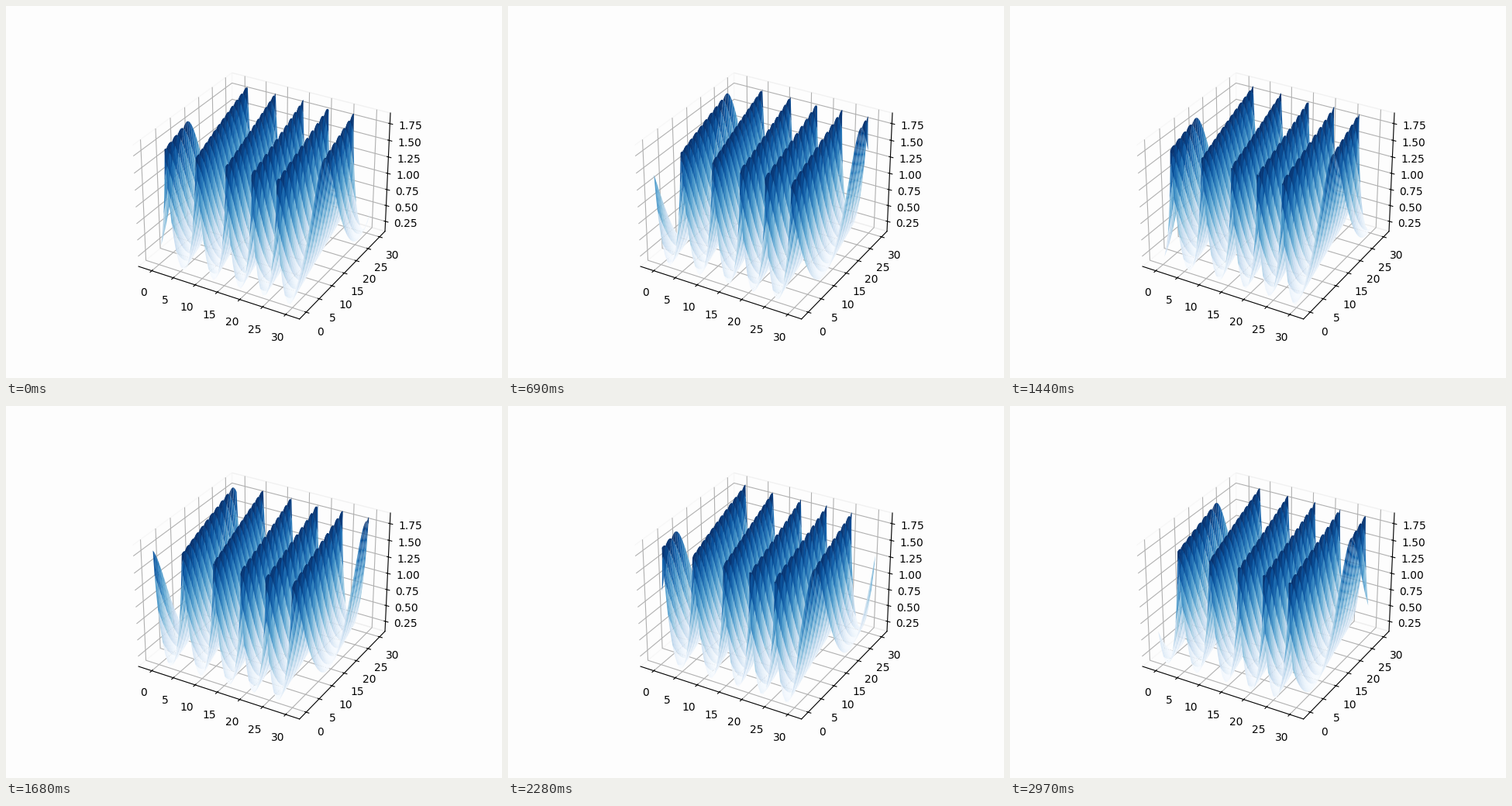
These frames come from a looping animation (640x480 px, 3000 ms). A matplotlib script:

```python
import numpy as np
import matplotlib.pyplot as plt
from matplotlib.animation import FuncAnimation
from mpl_toolkits.mplot3d.art3d import Poly3DCollection

FRAMES, INTERVAL = 100, 30
SIZE, CELLS = 30, 50
HEIGHT, PUSH_X, PUSH_Y = 0.87, 0.80, 0.19
KX, KY, OMEGA, OFFSET = 1.045, 0.215, 0.4, 2.33
PAPER = "#fdfdfd"

# two steps per cell, so that cell edges follow the curve
grid = np.linspace(0, SIZE, 2 * CELLS + 1)
X0, Y0 = np.meshgrid(grid, grid)
# crests bow to the right in the middle, most of all near the front
BOW = (1.45 - 0.02 * Y0) * np.sin(np.pi * X0 / SIZE) ** 2
PHASE = KX * (X0 - BOW) + KY * Y0 - OFFSET


def wave(frame):
    """Trochoidal wave: points circle around their rest position."""
    theta = PHASE - OMEGA * frame
    return np.stack([X0 - PUSH_X * np.sin(theta),
                     Y0 - PUSH_Y * np.sin(theta),
                     1 + HEIGHT * np.cos(theta)], axis=-1)


def cells(p):
    """Outline of every cell: its corners and edge midpoints."""
    low, mid, high = slice(0, -1, 2), slice(1, None, 2), slice(2, None, 2)
    ring = [(low, low), (low, mid), (low, high), (mid, high),
            (high, high), (high, mid), (high, low), (mid, low)]
    return np.stack([p[r, c] for r, c in ring], axis=2).reshape(-1, 8, 3)


fig = plt.figure(figsize=(6.4, 4.8), dpi=100, facecolor=PAPER)
ax = fig.add_subplot(projection="3d")
ax.set_facecolor(PAPER)
for axis in (ax.xaxis, ax.yaxis, ax.zaxis):
    axis.pane.fill = False

surface = Poly3DCollection(cells(wave(0)), cmap="Blues")
ax.add_collection3d(surface)
ax.set_xlim(-3.1, 32.95)
ax.set_ylim(-2.5, 32.42)
ax.set_zlim(0.092, 1.906)


def update(frame):
    faces = cells(wave(frame))
    surface.set_verts(faces)
    surface.set_array(faces[:, :, 2].mean(axis=1))
    surface.autoscale()
    return [surface]


anim = FuncAnimation(fig, update, frames=FRAMES, interval=INTERVAL,
                     init_func=lambda: update(0), repeat=True, repeat_delay=0)
plt.show()
```
